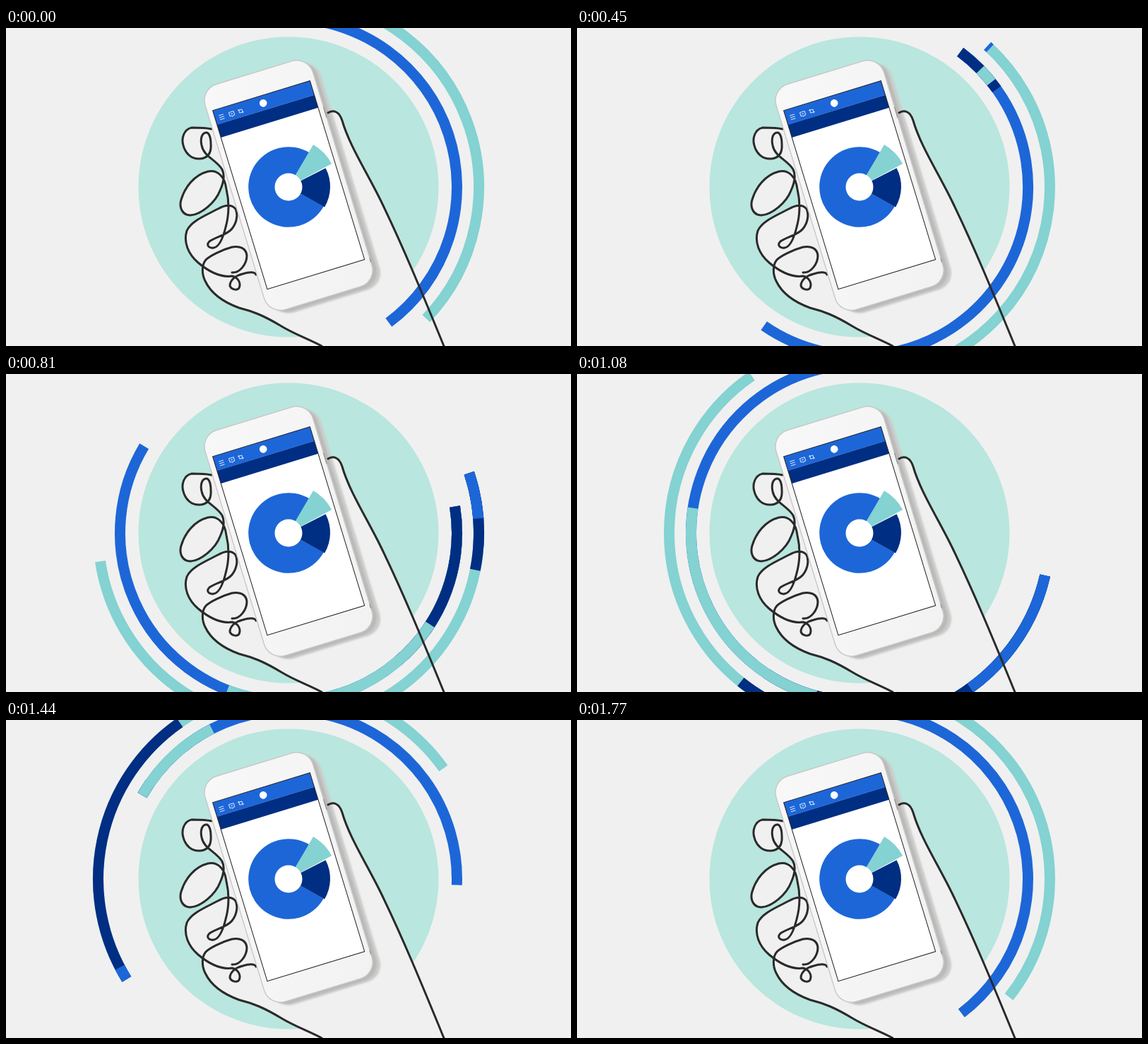
Recreate the animation shown at these times as an HTML page. Size 800 px wide and 450 px high, loop 1.8 s.

```html
<!DOCTYPE html>
<html lang="en">
<head>
<meta charset="utf-8">
<title>Phone with spending rings</title>
<style>
  html, body { margin: 0; width: 100%; height: 100%; overflow: hidden; background: #f0f0f0; }
  svg { display: block; width: 800px; height: 450px; }
  .ring { fill: none; stroke-width: 15; }
  .line { fill: none; stroke: #2a2a2a; stroke-width: 3; stroke-linecap: round; stroke-linejoin: round; }
  .icon { fill: none; stroke: #fff; stroke-width: 0.8; }
</style>
</head>
<body>
<svg viewBox="0 0 800 450">
  <defs>
    <filter id="soft" x="-10%" y="-10%" width="120%" height="120%"><feGaussianBlur stdDeviation="1"/></filter>
    <linearGradient id="shell" x1="0" y1="0" x2="1" y2="1">
      <stop offset="0" stop-color="#f8f8f8"/><stop offset="1" stop-color="#f2f2f2"/>
    </linearGradient>
  </defs>

  <circle cx="400" cy="225" r="212.5" fill="#b9e6de"/>

  <!-- skin -->
  <g fill="#f0f0f0">
    <path d="M291 143C283 141 271 141 263 141C252 143 248 156 251 166C254 178 263 186 275 185L284 179C291 186 299 189 306 200L340 240L330 143Z"/>
    <path d="M307 205C308 219 303 230 303 230C297 246 277 264 261 265C249 265 245 253 248 243C253 226 266 208 286 203C296 201 303 202 307 205Z"/>
    <path d="M306 200C311 214 314 230 314 251C308 251 304 254 300 256C285 264 262 273 256 287C251 303 258 322 279 338C278 348 279 352 282 358C291 377 308 388 330 396C350 401 365 407 390 422C408 433 428 440 447 450H620C588 372 562 309 531 245C511 204 486 166 476 131C472 118 463 115 456 120L340 180Z"/>
  </g>

  <g id="rings" class="ring"></g>

  <g transform="translate(399.9 223) rotate(-17)" filter="url(#soft)">
    <rect x="-70" y="-160" width="159.5" height="334" rx="25" fill="#cbccc9"/>
    <rect x="-74" y="-163" width="159" height="334" rx="25" fill="#b9bab7"/>
  </g>

  <g class="line">
    <path d="M291 143C283 141 271 141 263 141C252 143 248 156 251 166C254 178 263 186 275 185C286 184 291 177 290 164C290 154 287 147 283 148C277 149 275 157 277 166C280 182 297 186 306 200C310 208 308 219 303 230C297 246 277 264 261 265C249 265 245 253 248 243C253 226 266 208 286 203C300 200 310 211 312 228C316 245 316 264 311 282C307 298 302 310 294 311C287 312 283 307 288 302C296 296 313 293 320 284C328 274 328 262 325 256C319 249 309 251 300 256C285 264 262 273 256 287C251 303 258 320 272 332C291 348 306 353 320 351C329 353 333 361 330 368C327 372 319 370 317 365C317 356 326 350 335 348C345 345 352 345 354 349"/>
    <path d="M320 346C331 347 341 334 341 322C340 311 330 308 320 310C305 314 288 323 283 328C277 335 277 348 282 358C291 377 308 388 330 396C350 401 365 407 390 422C408 433 428 440 447 450"/>
    <path d="M456 120C463 115 472 118 476 131C486 166 511 204 531 245C562 309 588 372 620 450"/>
  </g>

  <!-- phone -->
  <g transform="translate(399.9 223) rotate(-17)">
    <rect x="-79.5" y="-167" width="159.5" height="333.5" rx="24" fill="url(#shell)" stroke="#c8c8c8" stroke-width="1.4"/>
    <path d="M80 -92V-76M80 132V138" stroke="#999" stroke-width="1.5"/>
    <rect x="-71.5" y="-133" width="144" height="264.5" fill="#fff"/>
    <rect x="-71.5" y="-133" width="144" height="21" fill="#1d66d8"/>
    <rect x="-71.5" y="-112" width="144" height="19" fill="#002e83"/>
    <rect x="-71.5" y="-133" width="144" height="264.5" fill="none" stroke="#222"/>
    <g class="icon">
      <path d="M-65.5 -123.5H-58.5M-65.5 -120.5H-58.5M-65.5 -117.5H-58.5"/>
      <path d="M-50.5 -123.5H-43.5V-118H-46L-47 -116.5L-48 -118H-50.5ZM-48.5 -120.7H-45.5"/>
      <path d="M-36 -124V-118.5H-30M-37.5 -122.5H-31.5V-117"/>
    </g>
    <circle cx="0" cy="-122" r="5.3" fill="#fff"/>
  </g>

  <g id="pie"></g>
</svg>
<script>
const BLUE = '#1d66d8', NAVY = '#002e83', TEAL = '#84d2d2';
const CX = 400, CY = 225, LOOP = 1800, STEP = 30;
const TOP = -90, TURN = 360, DRIFT = 147;

// Cubic Bezier easing, solved by bisection.
function bezier(x1, y1, x2, y2) {
  const at = (s, a, b) => 3 * (1 - s) ** 2 * s * a + 3 * (1 - s) * s * s * b + s ** 3;
  return x => {
    let lo = 0, hi = 1;
    for (let i = 0; i < 24; i++) {
      const mid = (lo + hi) / 2;
      if (at(mid, x1, x2) < x) lo = mid; else hi = mid;
    }
    return at(lo, y1, y2);
  };
}
const smoother = u => {
  u = Math.min(1, Math.max(0, u));
  return u ** 3 * (10 - 15 * u + 6 * u * u);
};

// Angles in degrees, clockwise from three o'clock, for loop progress x.
// A tail drifts steadily, then surges round; each head makes one eased turn.
const tail = (angle, surge, delay, span) =>
  x => angle + DRIFT * x + surge * smoother((x - delay) / span);
const head = (color, angle, ...curve) => {
  const ease = bezier(...curve);
  return { color, end: x => angle + TURN * ease(x) };
};

// Heads are listed from bottom to top.
const RINGS = [
  {
    r: 238.5,
    start: tail(TOP, TURN - DRIFT, 0.3, 0.7),
    heads: [
      head(BLUE, 53.5, 0.2, 0, 0.8, 1),
      head(NAVY, TOP, 0.35, 0.05, 0.7, 0.9),
      head(TEAL, TOP, 0.45, 0, 0.25, 0.81),
      head(NAVY, TOP, 0.4, 0.05, 0.75, 0.9)
    ]
  },
  {
    r: 269.5,
    start: tail(-84.5, 185, 0.5, 0.53),
    heads: [
      head(TEAL, 43.7, 0.3, 0.05, 0.77, 0.8),
      head(BLUE, TOP, 0.33, 0.13, 0.67, 0.35),
      head(NAVY, TOP, 0.65, 0.02, 0.45, 0.88),
      head(BLUE, TOP, 0.33, 0.015, 0.67, 0.42)
    ]
  }
];

const point = (r, deg, cx, cy) => {
  const a = deg * Math.PI / 180;
  return (cx + r * Math.cos(a)).toFixed(2) + ' ' + (cy + r * Math.sin(a)).toFixed(2);
};
const arc = (r, from, to, cx = CX, cy = CY) =>
  `M${point(r, from, cx, cy)}A${r} ${r} 0 ${to - from > 180 ? 1 : 0} 1 ${point(r, to, cx, cy)}`;

function add(parent, attrs) {
  const path = document.createElementNS('http://www.w3.org/2000/svg', 'path');
  for (const name in attrs) path.setAttribute(name, attrs[name]);
  return parent.appendChild(path);
}

const ringGroup = document.getElementById('rings');
for (const { heads } of RINGS) {
  for (const h of heads) h.path = add(ringGroup, { stroke: h.color });
}

const pie = document.getElementById('pie');
const slice = (fill, r, from, to, cx, cy) =>
  add(pie, { fill, d: arc(r, from, to, cx, cy) + `L${CX} ${CY}Z` });
slice(BLUE, 56.8, 29, 301);
slice(NAVY, 57, -27.5, 30.5, 402, 224.5);
slice(TEAL, 69.5, -59.7, -28.4);
add(pie, { fill: '#fff', d: arc(19.5, 0, 180) + arc(19.5, 180, 360) });

function draw(x) {
  for (const { r, start, heads } of RINGS) {
    const from = start(x);
    for (const { end, path } of heads) {
      const to = end(x);
      path.setAttribute('d', to > from ? arc(r, from, to) : '');
    }
  }
}

const began = performance.now();
function tick() {
  const t = (performance.now() - began) % LOOP;
  draw(Math.floor(t / STEP) * STEP / LOOP);
  requestAnimationFrame(tick);
}
tick();
</script>
</body>
</html>
```
